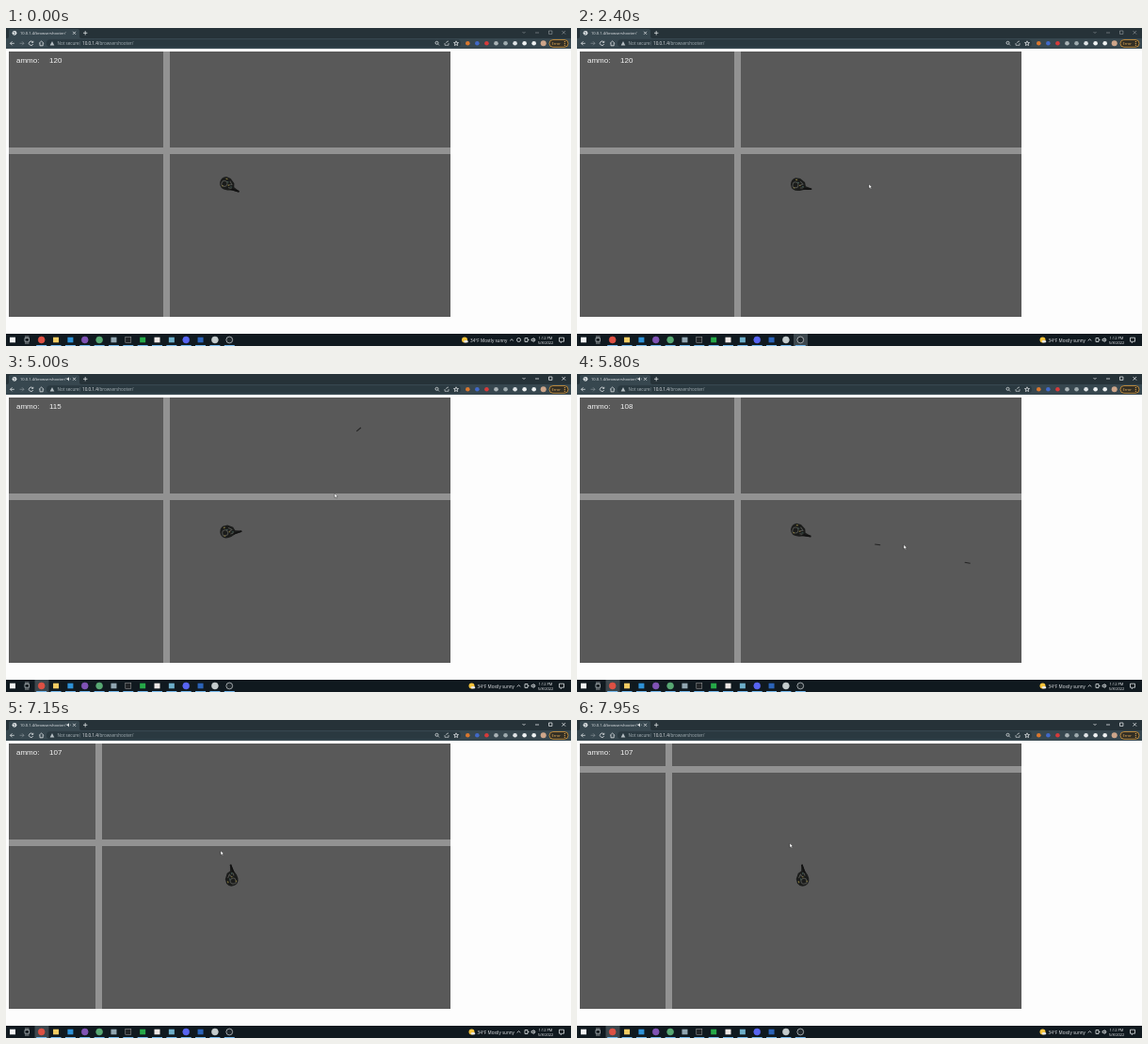
These frames come from a looping animation (600x338 px, 8 s). An HTML page:

```html
<!DOCTYPE html>
<html lang="en">
<head>
<meta charset="utf-8">
<title>Browser shooter</title>
<style>
  html, body { margin: 0; width: 100%; height: 100%; overflow: hidden; background: #fdfdfd; }
  svg { display: block; width: 100vw; height: 100vh; }
  text { font-family: "Open Sans", "Noto Sans", sans-serif; fill: #e8eaed; font-size: 4.6px; }
  .hud { font: 8px "Liberation Sans", Arial, sans-serif; fill: #f4f4f4; }
  .line { fill: none; stroke: #dfe3e5; stroke-width: .8; }
  .road { fill: #929292; }
  .dim { opacity: .4; }
  .mid { text-anchor: middle; }
</style>
</head>
<body>
<svg viewBox="0 0 600 338" preserveAspectRatio="none">
  <defs><clipPath id="field"><rect x="3" y="25" width="469" height="282"/></clipPath></defs>

  <!-- browser window -->
  <rect width="600" height="22" fill="#263238"/>
  <path d="M1 11Q3 11 3 9V3Q3 1 5 1H76Q78 1 78 3V9Q78 11 80 11H600V22H0V11Z" fill="#37474f"/>
  <circle cx="9" cy="5.3" r="2.4" fill="#dfe3e5"/>
  <path d="M7.5 4l2 1-1 2" stroke="#53626a" stroke-width=".7" fill="none"/>
  <text x="15" y="7" style="font-size:4.1px">10.0.1.4/browsershooter/</text>
  <path id="sound" d="M64.5 4.5h1l1.5-1.3v4.2l-1.5-1.3h-1zM68 4q1 1.3 0 2.6" fill="#dfe3e5"/>
  <path class="line" d="M71 3.8l3 3m0-3l-3 3M82 5.3h4.4m-2.2-2.2v4.4"/>
  <g id="controls" class="line">
    <path d="M548.5 4l1.5 1.5 1.5-1.5M562 5h4M576.5 3h3.4v3.4h-3.4zM590.5 3l3.6 3.6m0-3.6l-3.6 3.6"/>
  </g>
  <rect x="43" y="12.3" width="440" height="8" rx="4" fill="#2a3940"/>
  <path class="line" d="M8.8 16.3H4.5m2-2l-2 2 2 2"/>
  <path class="line dim" d="M14.5 16.3h4.5m-2-2l2 2-2 2"/>
  <path class="line" d="M28.4 15a2.2 2.2 0 1 0 .3 2M28.8 13.8v1.6h-1.6M35 16.4l2.6-2.4 2.6 2.4M36 16v2.8h3.2V16"/>
  <path d="M49 14l2.3 4.4h-4.6z" fill="#b4bdc1"/>
  <text x="54.5" y="18" style="fill:#aab4b9">Not secure</text>
  <path d="M78.5 14v4.6" stroke="#62727a" stroke-width=".5"/>
  <text x="81" y="18">10.0.1.4<tspan fill="#a5b0b5">/browsershooter/</tspan></text>
  <g class="line">
    <circle cx="457.5" cy="15.8" r="1.5"/>
    <path d="M458.6 17l1.5 1.5M466 16v2.3h4V16m-2.5 0q0-2 2.5-2" opacity=".8"/>
    <path d="M478 13.8l.7 1.7 1.8.1-1.4 1.2.5 1.8-1.6-1-1.6 1 .5-1.8-1.4-1.2 1.8-.1z"/>
  </g>
  <g id="extensions"></g>
  <rect x="577" y="12.5" width="20" height="7.8" rx="3.9" fill="#332f25" stroke="#d99a3b" stroke-width=".8"/>
  <text x="579.5" y="18" style="font-size:4px;fill:#f0b55a">Error</text>
  <path d="M593.3 14v4.8" stroke="#f0b55a" stroke-width="1" stroke-dasharray="1 .9"/>

  <!-- game -->
  <g clip-path="url(#field)">
    <rect x="3" y="25" width="469" height="282" fill="#595959"/>
    <rect id="roadY" class="road" y="25" width="7" height="282"/>
    <rect id="roadX" class="road" x="3" width="469" height="7"/>
    <g id="bullets" stroke="#242424" stroke-width="1.1"></g>
    <g id="player">
      <path d="M-11 1Q-11-5-6-6.5L-1-6 4-2 5 2 11 4.3V5.6L4 5.6-1 7Q-10 8-11 1Z" fill="#1b1c1b"/>
      <path d="M-9 2q0-4 3-4t3 3-3 3-3-2M-1-3l3 3-3 1M-1 4h4" fill="none" stroke="#50514d" stroke-width="1"/>
      <path d="M-6-4.5h2M-2 1.5h1.5M-8 4h1.5" stroke="#80753e" stroke-width="1.2"/>
      <path d="M-4-1.5h2M1 2.6h2" stroke="#3d5650" stroke-width="1.1"/>
      <path d="M2 4.9H11.4" stroke="#111" stroke-width="1.6"/>
    </g>
    <text class="hud" x="11" y="37">ammo:</text>
    <text class="hud" x="46" y="37" id="ammo"></text>
  </g>

  <!-- taskbar -->
  <rect y="325" width="600" height="13" fill="#10191f"/>
  <rect id="focusTile" y="325" width="15" height="13" fill="#3c474d"/>
  <g id="apps"></g>
  <path class="line" d="M20 329.5h4.5v3.8H20zM20 335h4.5M20 328h4.5" opacity=".8"/>
  <g id="weather">
    <circle cx="494.5" cy="331.5" r="3" fill="#f5c33b"/>
    <ellipse cx="496" cy="333.3" rx="2.4" ry="1.3" fill="#e6e8ea"/>
    <text x="500.5" y="333.5">34°F</text>
    <text x="511.5" y="333.5">Mostly sunny</text>
    <path class="line" d="M542.7 332.4l1.8-1.7 1.8 1.7"/>
  </g>
  <circle id="extraTray" class="line" cx="544.5" cy="331.5" r="2"/>
  <path class="line" d="M551 329.5h3v4h-3zM554 331.5h1.5M558 330.7h1l1.3-1.2v4l-1.3-1.2h-1zM561.3 330q1.2 1.5 0 3"/>
  <text class="mid" x="573" y="330.6" style="font-size:4px">1:12 PM</text>
  <text class="mid" x="573" y="336.3" style="font-size:4px">5/8/2022</text>
  <path class="line" d="M587.5 329.2h5v4h-2l-1.2 1.4v-1.4h-1.8z"/>

  <path id="cursor" d="M0 0V4.6L1.1 3.6 1.9 5.3 2.7 4.9 1.9 3.3H3.3Z" fill="#fff" stroke="#222" stroke-width=".35"/>
</svg>
<script>
const LOOP = 8000, PIVOT = [238, 166], BULLET_SPEED = 0.65, REST_ANGLE = 0.28;
const FOCUS_AT = 2880, TRAY_AT = 100, CURSOR_AT = 800;

// Each row: time, then the values at that time.
const cursorPath = [
  [800, 604, 60], [1500, 480, 115], [2000, 325, 165], [2400, 310, 166], [2900, 330, 152],
  [3400, 355, 112], [3800, 350, 110], [4300, 335, 86], [4750, 339, 80], [5000, 349, 127],
  [5300, 350, 190], [5700, 350, 178], [6100, 338, 192], [6450, 329, 190], [6700, 318, 155],
  [6900, 270, 140], [7150, 228, 139], [7500, 184, 153], [7950, 226, 131]
];
const roadColumn = [[6235, 167], [6305, 159], [6540, 159], [7150, 95], [7500, 54], [7530, 51], [7580, 51], [7950, 94]];
const roadRow = [[7200, 127], [7500, 96], [7950, 49]];
const shots = [2880, 4050, 4320, 4520, 4750, 5080, 5160, 5240, 5320, 5400, 5540, 5690, 5840];

const $ = id => document.getElementById(id);
const make = (parent, tag, attrs) => {
  const node = document.createElementNS("http://www.w3.org/2000/svg", tag);
  for (const key in attrs) node.setAttribute(key, attrs[key]);
  return parent.appendChild(node);
};
const set = (id, key, value) => $(id).setAttribute(key, value);
const show = (node, on) => node.setAttribute("visibility", on ? "visible" : "hidden");

function sample(track, t) {
  if (t <= track[0][0]) return track[0].slice(1);
  const i = track.findIndex(row => row[0] > t);
  if (i < 0) return track[track.length - 1].slice(1);
  const a = track[i - 1], b = track[i], k = (t - a[0]) / (b[0] - a[0]);
  return a.slice(1).map((v, j) => v + (b[j + 1] - v) * k);
}

function aim(t) {
  const [x, y] = sample(cursorPath, t);
  return t < CURSOR_AT || x > 472 ? REST_ANGLE : Math.atan2(y + 2 - PIVOT[1], x - PIVOT[0]);
}

["#d9772e", "#4169c8", "#d63a3a", "#a9b2b5", "#9eaaae", "#dfe3e5", "#eef1f2", "#eef1f2", "#cda58a"]
  .forEach((fill, i) => make($("extensions"), "circle", { cx: 490.3 + i * 10.05, cy: 16.3, r: i === 8 ? 3 : 2.3, fill }));

["#f2f4f5", "", "#dd5144", "#f3cc63", "#2e91d6", "#8053b5", "#58a873", "#91a6b1", "#202326",
  "#26a948", "#eee8e5", "#6daec9", "#5865f2", "#2b63b8", "#c4cccd", "#d2d6d8"].forEach((fill, i) => {
  if (!fill) return;
  const x = 7 + i * 15.35;
  const round = [2, 5, 6, 12, 14, 15].includes(i);
  if (round) make($("apps"), "circle", { cx: x, cy: 331.5, r: 3.4, fill: i === 15 ? "#20282d" : fill, stroke: fill, "stroke-width": .7 });
  else make($("apps"), "rect", { x: x - 3, y: 328.7, width: 6, height: 5.6, fill, stroke: i === 8 ? "#aaa" : "none", "stroke-width": .5 });
  if (i > 1) make($("apps"), "rect", { x: x - 5.5, y: 337, width: 11, height: 1, fill: "#76b9ed" });
});

const bullets = shots.map(time => {
  const angle = aim(time), c = Math.cos(angle), s = Math.sin(angle);
  return {
    time,
    x: PIVOT[0] + 11 * c - 5 * s, y: PIVOT[1] + 11 * s + 5 * c, c, s,
    node: make($("bullets"), "path", { d: "M-3 0H3" }), degrees: angle * 180 / Math.PI
  };
});

function draw(t) {
  const [x, y] = sample(cursorPath, t);
  const focused = t >= FOCUS_AT, settled = t >= TRAY_AT;
  set("cursor", "transform", `translate(${x} ${y})`);
  show($("cursor"), t >= CURSOR_AT);
  set("player", "transform", `translate(${PIVOT}) rotate(${aim(t) * 180 / Math.PI})`);
  set("roadY", "x", sample(roadColumn, t)[0]);
  set("roadX", "y", sample(roadRow, t)[0]);
  $("ammo").textContent = 120 - shots.filter(time => time <= t).length;
  for (const b of bullets) {
    const distance = (t - b.time) * BULLET_SPEED;
    show(b.node, distance >= 0 && distance < 400);
    b.node.setAttribute("transform", `translate(${b.x + distance * b.c} ${b.y + distance * b.s}) rotate(${b.degrees})`);
  }
  show($("sound"), focused);
  set("controls", "opacity", focused ? 1 : .45);
  set("focusTile", "x", focused ? 30.5 : 230);
  show($("focusTile"), settled);
  set("weather", "transform", `translate(${settled ? 0 : -7.5} 0)`);
  show($("extraTray"), true);
  set("extraTray", "cx", settled ? 552.5 : 544.5);
  show($("extraTray"), !settled);
}

let start;
function tick(now) {
  start ??= now;
  draw((now - start) % LOOP);
  requestAnimationFrame(tick);
}
draw(0);
requestAnimationFrame(tick);
</script>
</body>
</html>
```
